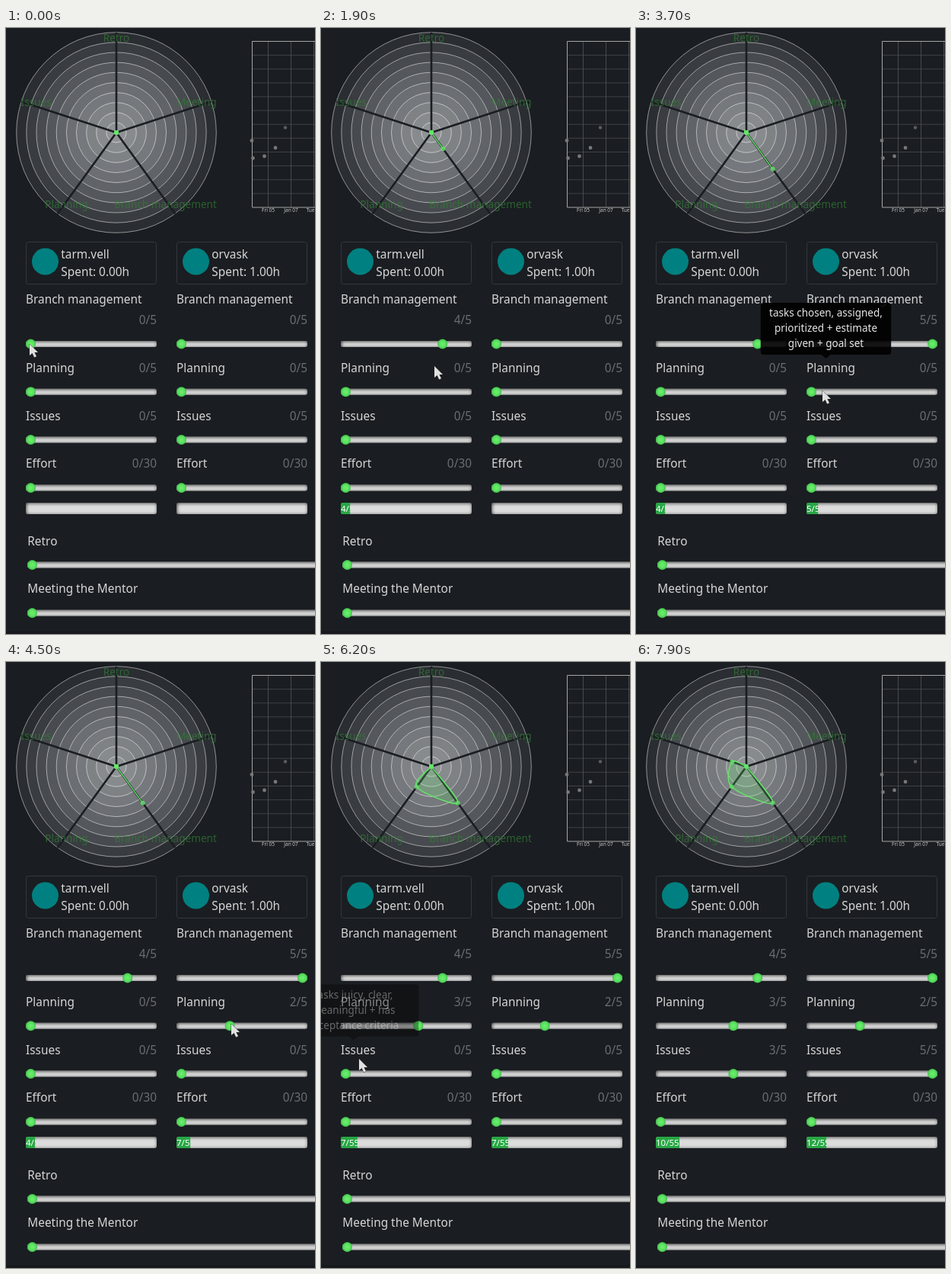
An HTML page with a canvas that plays this animation: 406x794 px, repeating every 8 s.

```html
<!DOCTYPE html>
<html lang="en">
<head>
<meta charset="utf-8">
<title>Team assessment</title>
<style>
  html, body { margin: 0; height: 100%; overflow: hidden; background: #1a1d21; }
  canvas { display: block; }
</style>
</head>
<body>
<canvas id="stage" width="406" height="794"></canvas>
<script>
const ctx = document.getElementById('stage').getContext('2d');
const LOOP = 8000, TICK = 100, TAU = Math.PI * 2;
const BACK = '#1a1d21', LIGHT = '#d6d6d6', MUTED = '#6a6d71', GREEN = '#62e768';

const people = [
  { x: 26, name: 'tarm.vell', spent: '0.00h' },
  { x: 224, name: 'orvask', spent: '1.00h' }
];
const rows = [
  { label: 'Branch management', base: 361, valueBase: 388, track: 414, max: 5 },
  { label: 'Planning', base: 451, valueBase: 451, track: 476.7, max: 5 },
  { label: 'Issues', base: 514, valueBase: 514, track: 539.5, max: 5 },
  { label: 'Effort', base: 576, valueBase: 576, track: 602.5, max: 30 }
];
// Each step is [time, value]; the radar picks up the value on release.
const drags = [
  { col: 0, row: 0, steps: [[600, 1], [800, 2], [1000, 3], [1300, 4]], release: 1600 },
  { col: 1, row: 0, steps: [[3200, 5]], release: 3500 },
  { col: 1, row: 1, steps: [[4200, 1], [4400, 2]], release: 4700 },
  { col: 0, row: 1, steps: [[5300, 1], [5400, 2], [5500, 3]], release: 5700 },
  { col: 0, row: 2, steps: [[6400, 1], [6500, 2], [6600, 3]], release: 6800 },
  { col: 1, row: 2, steps: [[7780, 5]], release: LOOP }
];
// [time, x, y]
const cursorPath = [
  [0, 31, 414], [200, 31, 414], [1300, 160, 415], [1600, 160, 415], [1900, 149, 443],
  [2400, 229, 414], [3100, 229, 414], [3200, 388, 415], [3400, 388, 415], [3600, 252, 448],
  [3700, 245, 475], [4000, 231, 477], [4400, 296, 474], [4600, 296, 474], [4900, 230, 478],
  [5200, 33, 478], [5500, 129, 478], [5800, 129, 478], [6000, 65, 505], [6200, 50, 520],
  [6300, 33, 540], [6600, 131, 536], [7000, 131, 536], [7600, 231, 540], [7700, 231, 540],
  [7800, 420, 540], [8000, 420, 540]
];
const tooltips = [
  { x: 249.5, y: 360, from: 3550, to: 3850,
    lines: ['tasks chosen, assigned,', 'prioritized + estimate', 'given + goal set'] },
  { x: 42.5, y: 422.5, from: 6140, to: 6400,
    lines: ['tasks juicy, clear,', 'meaningful + has', 'acceptance criteria'] }
];

const mix = (a, b, k) => a + (b - a) * k;
const clamp = k => Math.min(1, Math.max(0, k));

// The CSS "ease" curve, cubic-bezier(.25, .1, .25, 1)
function ease(x) {
  const bezier = (a, b, s) => 3 * a * s * (1 - s) ** 2 + 3 * b * s * s * (1 - s) + s ** 3;
  let low = 0, high = 1;
  x = clamp(x);
  for (let i = 0; i < 20; i++) {
    const mid = (low + high) / 2;
    if (bezier(.25, .25, mid) < x) low = mid; else high = mid;
  }
  return x === 1 ? 1 : bezier(.1, 1, low);
}

function sliderValue(col, row, t) {
  const drag = drags.find(d => d.col === col && d.row === row);
  return drag ? drag.steps.reduce((value, [at, v]) => at <= t ? v : value, 0) : 0;
}

function progress(col, t) {
  let from = 0, total = 0, start = -600, finished = 0;
  const shown = now => mix(from, total, ease((now - start) / 600));
  for (const { steps } of drags.filter(d => d.col === col)) {
    for (const [at, value] of steps) {
      if (at > t) break;
      from = shown(at);
      total = finished + value;
      start = at;
    }
    finished += steps.at(-1)[1];
  }
  return { total, shown: shown(t) };
}

function text(string, x, y, size = 15.4, color = LIGHT, align = 'left') {
  ctx.font = `${size}px "Noto Sans", sans-serif`;
  ctx.fillStyle = color;
  ctx.textAlign = align;
  ctx.fillText(string, x, y);
}

function line(x1, y1, x2, y2, color, width = 1) {
  ctx.beginPath();
  ctx.moveTo(x1, y1);
  ctx.lineTo(x2, y2);
  ctx.strokeStyle = color;
  ctx.lineWidth = width;
  ctx.stroke();
}

function disc(x, y, r, fill) {
  ctx.beginPath();
  ctx.arc(x, y, r, 0, TAU);
  ctx.fillStyle = fill;
  ctx.fill();
}

function box(x, y, w, h, r) {
  ctx.beginPath();
  ctx.roundRect(x, y, w, h, r);
}

// Light groove with an inner shadow
function groove(x, y, w, h) {
  ctx.save();
  box(x, y, w, h, 3);
  ctx.clip();
  ctx.fillStyle = '#dcdcdc';
  ctx.fill();
  ctx.beginPath();
  ctx.rect(x - 20, y - 20, w + 40, h + 40);
  ctx.roundRect(x, y, w, h, 3);
  ctx.shadowColor = 'rgba(0,0,0,.75)';
  ctx.shadowBlur = 4;
  ctx.shadowOffsetX = ctx.shadowOffsetY = .7;
  ctx.fill('evenodd');
  ctx.restore();
}

function slider(x, y, w, ratio) {
  groove(x, y - 4, w, 8);
  const knobX = x + 6.5 + ratio * (w - 13);
  const shade = ctx.createRadialGradient(knobX, y, 1, knobX, y, 6.5);
  shade.addColorStop(0, '#68ec6b');
  shade.addColorStop(.6, '#5ae05f');
  shade.addColorStop(1, '#3fb94a');
  disc(knobX, y, 6.5, shade);
}

function radar(t) {
  const cx = 145, cy = 137, radius = 131.3;
  const polar = (axis, k) => {
    const angle = axis * TAU / 5;
    return [cx + Math.sin(angle) * radius * k, cy - Math.cos(angle) * radius * k];
  };
  for (let ring = 10; ring > 0; ring--) {
    disc(cx, cy, radius * ring / 10, 'rgba(255,255,255,.07)');
    ctx.strokeStyle = 'rgba(255,255,255,.5)';
    ctx.lineWidth = 1;
    ctx.stroke();
  }
  for (let axis = 0; axis < 5; axis++) line(cx, cy, ...polar(axis, 1), BACK, 2.6);

  ctx.save();
  ctx.beginPath();
  ctx.rect(13, 0, 264.5, 275);
  ctx.clip();
  [['Retro', 145, 18], ['Meeting', 250.3, 102], ['Branch management', 209.5, 235.5],
   ['Planning', 79.5, 235.5], ['Issues', 39.7, 102]]
    .forEach(([label, x, y]) => text(label, x, y, 13.6, 'rgba(48,125,54,.7)', 'center'));
  ctx.restore();

  const sums = [0, 0, 0, 0, 0];
  for (const d of drags) if (d.release <= t) sums[d.row + 2] += d.steps.at(-1)[1];
  const points = sums.map((sum, axis) => polar(axis, sum / 20));
  const at = i => points[(i + 5) % 5];
  const control = (i, sign) => [0, 1].map(c => at(i)[c] + sign * (at(i + 1)[c] - at(i - 1)[c]) / 6);
  ctx.beginPath();
  ctx.moveTo(...points[0]);
  for (let i = 0; i < 5; i++) ctx.bezierCurveTo(...control(i, 1), ...control(i + 1, -1), ...at(i + 1));
  ctx.fillStyle = 'rgba(98,231,104,.22)';
  ctx.fill();
  ctx.strokeStyle = GREEN;
  ctx.lineWidth = 1.4;
  ctx.stroke();
  ctx.globalAlpha = .8;
  for (const p of points) disc(...p, 3, GREEN);
  ctx.globalAlpha = 1;
}

function scatter() {
  const left = 323.5, top = 17.5, bottom = 235;
  for (let i = 1; i < 12; i++) {
    const y = mix(top, bottom, i / 12);
    line(left, y, 406, y, '#484b4e', .8);
  }
  ['Fri 05', 'Jan 07', 'Tue 09'].forEach((label, i) => {
    const x = 344.5 + i * 30;
    line(x, top, x, bottom, '#54575a', .8);
    text(label, x, 241, 6.5, '#c4c4c4', 'center');
  });
  line(left, top, 406, top, '#a5a5a5');
  line(left, top, left, bottom, '#a5a5a5');
  line(left, bottom, 406, bottom, '#a5a5a5');
  [[323, 147.5], [324.5, 170.5], [339.5, 168], [354, 157]].forEach(p => disc(...p, 2.4, '#777'));
  disc(367, 130.5, 2.2, '#5c5c5c');
}

function person({ x, name, spent }, col, t) {
  box(x + .5, 280.5, 171, 55, 3);
  ctx.strokeStyle = '#34383c';
  ctx.lineWidth = 1;
  ctx.stroke();
  disc(x + 25.5, 306, 17.5, '#008080');
  text(name, x + 46.3, 302);
  text(`Spent: ${spent}`, x + 46.3, 325);

  rows.forEach(({ label, base, valueBase, track, max }, row) => {
    const value = sliderValue(col, row, t);
    text(label, x, base);
    text(`${value}/${max}`, x + 172, valueBase, 15.4, MUTED, 'right');
    slider(x, track, 172, value / max);
  });

  groove(x, 622, 172, 15);
  const { total, shown } = progress(col, t);
  if (!total) return;
  ctx.save();
  box(x, 622, 172, 15, 3);
  ctx.clip();
  ctx.beginPath();
  ctx.rect(x, 622, 172 * shown / 55, 15);
  ctx.clip();
  ctx.fillStyle = '#28a745';
  ctx.fill();
  text(`${total}/55`, x, 634, 11.55, '#fff');
  ctx.restore();
}

function tooltip({ x, y, from, to, lines }, t) {
  const fade = clamp((t - from) / 150) * (1 - clamp((t - to) / 150));
  if (!fade) return;
  ctx.save();
  ctx.globalAlpha = fade * .9;
  ctx.fillStyle = '#000';
  box(x - 85.7, y, 171.4, 68, 4);
  ctx.moveTo(x - 6, y + 68);
  ctx.lineTo(x, y + 73);
  ctx.lineTo(x + 6, y + 68);
  ctx.fill();
  lines.forEach((string, i) => text(string, x, y + 18 + i * 20.2, 13.5, '#fff', 'center'));
  ctx.restore();
}

function cursor(t) {
  const next = cursorPath.findIndex(([time]) => time > t);
  const [t0, x0, y0] = cursorPath[next - 1], [t1, x1, y1] = cursorPath[next];
  const k = (t - t0) / (t1 - t0);
  ctx.save();
  ctx.translate(mix(x0, x1, k), mix(y0, y1, k));
  ctx.fillStyle = '#e0e0e0';
  ctx.strokeStyle = '#2a2a2a';
  ctx.lineWidth = .8;
  ctx.stroke(new Path2D('M0 0V15L3.6 12L6.2 17.6L9 16.3L6.4 11H11Z'));
  ctx.fill(new Path2D('M0 0V15L3.6 12L6.2 17.6L9 16.3L6.4 11H11Z'));
  ctx.restore();
}

function draw(t) {
  ctx.fillStyle = BACK;
  ctx.fillRect(0, 0, 406, 794);
  ctx.fillStyle = '#17191d';
  ctx.fillRect(0, 790, 406, 4);
  radar(t);
  scatter();
  people.forEach((p, col) => person(p, col, t));
  text('Retro', 28.3, 678);
  slider(28, 703.5, 500, 0);
  text('Meeting the Mentor', 28.3, 740);
  slider(28, 766.5, 500, 0);
  tooltips.forEach(tip => tooltip(tip, t));
  cursor(t);
}

function frame() {
  draw(Math.floor(performance.now() % LOOP / TICK) * TICK);
  requestAnimationFrame(frame);
}
frame();
</script>
</body>
</html>
```
